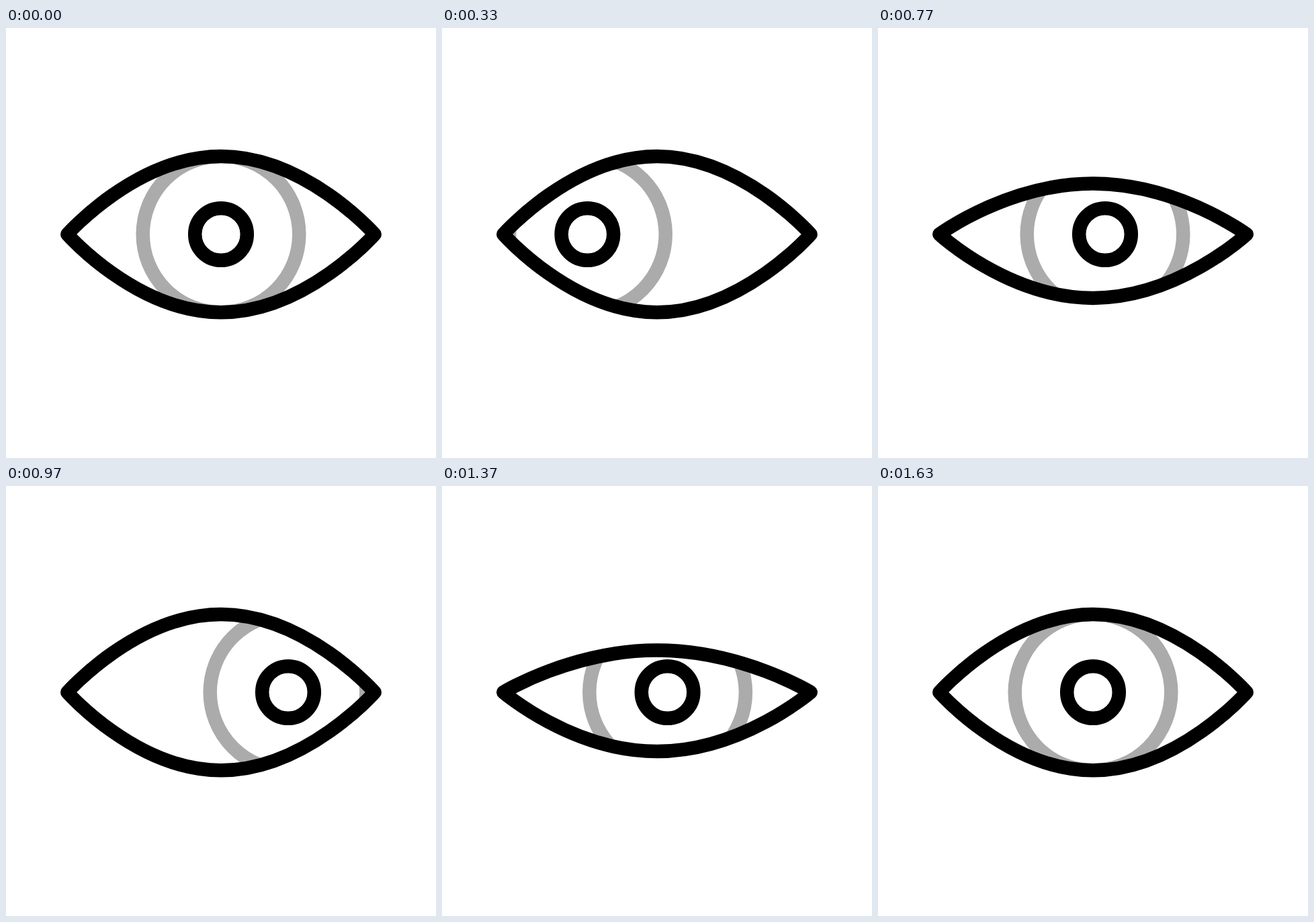
An HTML page that plays this animation: 640 px wide and 640 px high, repeating every 2000 ms.

```html
<!DOCTYPE html>
<html lang="en">
<head>
<meta charset="utf-8">
<title>Looking eye</title>
<style>
  html, body { margin: 0; width: 100%; height: 100%; overflow: hidden; background: #fff; }
  svg { display: block; width: 100%; height: 100%; }
</style>
</head>
<body>
<svg viewBox="0 0 640 640" fill="none" stroke="#000" stroke-width="20.5" stroke-linejoin="round">
  <clipPath id="opening"><path class="lids"/></clipPath>
  <g clip-path="url(#opening)">
    <g id="gaze">
      <circle cx="320" cy="307" r="116.3" stroke="#ababab"/>
      <circle cx="320" cy="307" r="38.8"/>
    </g>
  </g>
  <path class="lids"/>
</svg>
<script>
const LOOP = 2000, FPS = 30;
const lids = document.querySelectorAll('.lids');
const gaze = document.getElementById('gaze');

// Keys are [frame, value]
const gazeKeys = [[0, 0], [12.8, -118], [16, -118], [28, 100], [32, 100], [44, 0]];
const blinkKeys = [[13, 0], [19, 1], [25.05, 0], [39, 0], [44, 1], [49, 0]];

function valueAt(keys, frame) {
  const next = keys.findIndex(key => key[0] > frame);
  if (next < 0) return keys[keys.length - 1][1];
  if (next === 0) return keys[0][1];
  const [start, from] = keys[next - 1], [end, to] = keys[next];
  const x = (frame - start) / (end - start);
  return from + (to - from) * x * x * (3 - 2 * x);
}

// An ellipse whose left and right points are sharp corners
function lidPath(blink) {
  const top = 191 + 152 * blink;
  const bottom = 423.3 - 80.3 * blink;
  const left = 91.3, right = 548.7, middle = 320, y = 307;
  const handle = 0.5523 * (middle - left);
  return `M${left} ${y}` +
    `C${left} ${y} ${middle - handle} ${top} ${middle} ${top}` +
    `S${right} ${y} ${right} ${y}` +
    `S${middle + handle} ${bottom} ${middle} ${bottom}` +
    `S${left} ${y} ${left} ${y}Z`;
}

function draw() {
  // Steps fall on hundredths of a second, hence the 5 ms rounding offset
  const frame = Math.floor((performance.now() % LOOP + 5) * FPS / 1000) % (LOOP * FPS / 1000);
  const path = lidPath(valueAt(blinkKeys, frame));
  lids.forEach(lid => lid.setAttribute('d', path));
  gaze.setAttribute('transform', `translate(${valueAt(gazeKeys, frame)})`);
  requestAnimationFrame(draw);
}
draw();
</script>
</body>
</html>
```
